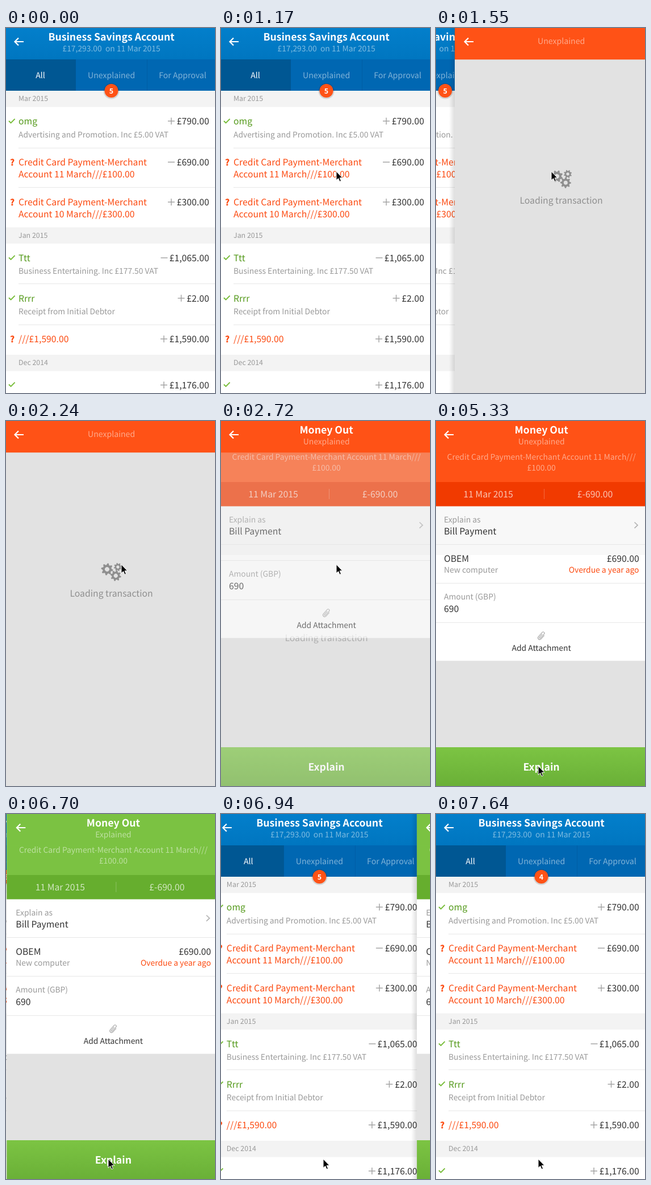
An HTML page for the animation above (8000 ms loop, 368x640 px).

```html
<!DOCTYPE html>
<html lang="en">
<head>
<meta charset="utf-8">
<title>Explain a transaction</title>
<style>
html, body { margin: 0; width: 100%; height: 100%; overflow: hidden; background: #fff; }
svg { display: block; width: 368px; height: 640px; }
text {
  font-family: "Noto Sans CJK JP", "Noto Sans CJK SC", "Noto Sans CJK KR", "Noto Sans CJK", "Open Sans", sans-serif;
  font-size: 15.75px; text-rendering: geometricPrecision;
}
.title { font-size: 17.7px; font-weight: 700; fill: #fff; }
.tab { font-size: 14.1px; }
.sub { font-size: 13.87px; }
.month { font-size: 12.4px; fill: #999; }
.mid { text-anchor: middle; }
.end { text-anchor: end; }
.grey { fill: #999; }
.dark { fill: #333; }
.orange { fill: #fc4a10; }
.green { fill: #559a1c; }
.soft { fill: #fff; fill-opacity: .5; }
.date { fill: #fff; fill-opacity: .7; }
.line { fill: none; }
</style>
</head>
<body>
<svg id="stage" viewBox="0 0 368 640" xmlns="http://www.w3.org/2000/svg"></svg>
<script>
const LOOP = 8000, CX = 185.6;
const ORANGE = [255, 82, 22], RED = [241, 58, 0], GREEN = [123, 194, 66], LEAF = [102, 174, 46];

// Markup helpers
const text = (x, y, cls, str, id = '') => `<text x="${x}" y="${y}" class="${cls}" id="${id}">${str}</text>`;
const rect = (x, y, w, h, fill, id = '') => `<rect x="${x}" y="${y}" width="${w}" height="${h}" fill="${fill}" id="${id}"/>`;
const path = (d, stroke, width, extra = '') => `<path class="line" d="${d}" stroke="${stroke}" stroke-width="${width}" ${extra}/>`;
const rule = (x, y) => rect(x, y, 374, 1, '#e7e7e7');
const group = (id, ...parts) => `<g id="${id}">${parts.join('')}</g>`;
const arrow = path('M31 24H15.5M22 17.5L15.5 24L22 30.5', '#fff', 2.2);

function month(y, label) {
  return rect(-2, y, 374, 28.5, '#f3f3f3') + text(22, y + 18.3, 'month', label);
}

function amount(y, x, sign, value) {
  const up = sign === '+' ? `M${x} ${y - 12}v12` : '';
  return path(`M${x - 6} ${y - 6}h12${up}`, '#a6a6a6', 1.5) + text(357.7, y, 'end dark', value);
}

const tick = y => path(`M5 ${y}l3.6 3.4l7 -7`, '#78bd3a', 2);
const query = y => text(11, y, 'mid orange', '?').replace('<text', '<text style="font-size:15px;font-weight:900" stroke="#fc4a10" stroke-width=".4"');

function gear(id, x, y, r, teeth) {
  let d = '';
  for (let i = 0; i < teeth * 4; i++) {
    const a = (i + .5) / (teeth * 4) * Math.PI * 2, k = i % 4 < 2 ? r : r * .74;
    d += `${i ? 'L' : 'M'}${(k * Math.cos(a)).toFixed(2)} ${(k * Math.sin(a)).toFixed(2)}`;
  }
  const h = r * .37;
  d += `ZM${h} 0A${h} ${h} 0 1 0 ${-h} 0A${h} ${h} 0 1 0 ${h} 0Z`;
  return `<g transform="translate(${x} ${y})"><path id="${id}" d="${d}" fill="#8f8f8f" fill-rule="evenodd"/></g>`;
}

const list = group('list',
  rect(-2, 0, 374, 640, '#fff'),
  rect(-2, 0, 374, 55, 'url(#sky)'), rect(-2, 55, 374, 55, '#0067b2'),
  rect(-2, 55, 125, 55, '#005793'), rect(248, 55, 1, 55, '#005ea5'),
  arrow,
  text(CX, 22.3, 'title mid', 'Business Savings Account'),
  text(CX, 40.5, 'sub soft mid', '£17,293.00\u00a0 on 11 Mar 2015'),
  text(60.5, 88, 'tab mid', 'All').replace('<text', '<text fill="#fff"'),
  text(CX, 88, 'tab soft mid', 'Unexplained'),
  text(311, 88, 'tab soft mid', 'For Approval'),
  month(110, 'Mar 2015'),
  '<circle cx="185.5" cy="110.5" r="14" fill="#000" fill-opacity=".13"/><circle cx="185.5" cy="110" r="12" fill="#ff5216"/>',
  text(185.5, 114.6, 'mid', '5', 'badge').replace('<text', '<text fill="#fff" style="font-size:12.5px;font-weight:700"'),
  tick(163), text(22, 169.3, 'green', 'omg'), amount(169.3, 291, '+', '£790.00'),
  text(22, 192, 'sub grey', 'Advertising and Promotion. Inc £5.00 VAT'),
  rule(22, 210),
  query(240.5), text(22, 241.2, 'orange', 'Credit Card Payment-Merchant'),
  text(22, 262.2, 'orange', 'Account 11 March///£100.00'), amount(241.2, 291, '-', '£690.00'),
  rule(22, 279),
  query(310.5), text(22, 311.2, 'orange', 'Credit Card Payment-Merchant'),
  text(22, 332.2, 'orange', 'Account 10 March///£300.00'), amount(311.2, 291, '+', '£300.00'),
  month(349.5, 'Jan 2015'),
  tick(402.5), text(22, 409, 'green', 'Ttt'), amount(409, 278.5, '-', '£1,065.00'),
  text(22, 431, 'sub grey', 'Business Entertaining. Inc £177.50 VAT'),
  rule(22, 448),
  tick(473), text(22, 479.7, 'green', 'Rrrr'), amount(479.7, 308.5, '+', '£2.00'),
  text(22, 502, 'sub grey', 'Receipt from Initial Debtor'),
  rule(22, 520),
  query(550.5), text(22, 551.2, 'orange', '///£1,590.00'), amount(551.2, 278, '+', '£1,590.00'),
  month(573, 'Dec 2014'),
  tick(625), amount(632, 278, '+', '£1,176.00'));

const loading = group('loading',
  group('gears', gear('g1', 178, 260, 10.5, 8), gear('g2', 197, 256, 7.2, 8), gear('g3', 193.3, 271.3, 9.5, 8)),
  text(CX, 307.7, 'mid', 'Loading transaction', 'wait').replace('<text', '<text fill="#8f8f8f"'));

const lower = group('lower',
  rect(-2, 217, 374, 203.5, '#fff'), rule(-2, 284),
  text(14, 313.3, 'sub grey', 'Amount (GBP)'), text(14, 334.5, 'dark', '690'),
  rule(-2, 353),
  path('M3-4V4a3 3 0 0 1-6 0V-5.500a2.100 2.100 0 0 1 4.200 0V3.500a1.100 1.100 0 0 1-2.200 0V-3.500', '#a9a9a9', 1.1,
    'transform="translate(185.5 377) rotate(42) scale(1.05)"'),
  text(CX, 403, 'sub dark mid', 'Add Attachment'));

const bill = group('bill',
  text(14, 247.2, 'dark', 'OBEM'), text(357.7, 247.2, 'dark end', '£690.00'),
  text(14, 266.3, 'sub grey', 'New computer'), text(357.5, 266.3, 'sub orange end', 'Overdue a year ago'));

const content = group('content',
  lower,
  rect(-2, 149, 374, 86, '#f8f8f8', 'band'), rule(-2, 216),
  rect(-2, 55, 374, 52, '', 'memo'), rect(-2, 107, 374, 42.5, '', 'strip'),
  text(CX, 67.6, 'sub soft mid', 'Credit Card Payment-Merchant Account 11 March///'),
  text(CX, 87, 'sub soft mid', '£100.00'),
  text(92, 134.3, 'date mid', '11 Mar 2015'), text(280, 134.3, 'date mid', '£-690.00'),
  '<rect x="190" y="119" width="1" height="18" fill="#fff" fill-opacity=".25"/>',
  text(14, 178, 'sub grey', 'Explain as'), text(14, 199, 'dark', 'Bill Payment'),
  path('M349.500 177.500l5.500 5.200l-5.500 5.200', '#b3b3b3', 1.7),
  bill,
  rect(-2, 572, 374, 68, 'url(#leaf)'),
  text(CX, 612.8, 'title mid', 'Explain'));

const detail = group('detail',
  rect(-12, 0, 10, 640, 'url(#shade)'), rect(-2, 0, 374, 640, '#e2e2e2'),
  loading, content,
  rect(-2, 0, 374, 55.3, '', 'bar'), arrow,
  text(CX, 28.3, 'tab soft mid', 'Unexplained', 'early'),
  group('heading',
    text(CX, 22.3, 'title mid', 'Money Out'),
    text(CX, 40.5, 'sub soft mid', 'Unexplained', 'before'),
    text(CX, 40.5, 'sub soft mid', 'Explained', 'after')));

const grad = (id, dir, a, b) => `<linearGradient id="${id}" ${dir}><stop ${a}/><stop offset="1" ${b}/></linearGradient>`;
const down = 'x1="0" y1="0" x2="0" y2="1"';
document.getElementById('stage').innerHTML = '<defs>' +
  grad('sky', down, 'stop-color="#037fcb"', 'stop-color="#0076c0"') +
  grad('leaf', down, 'stop-color="#7cc443"', 'stop-color="#6ab037"') +
  grad('shade', '', 'stop-opacity="0"', 'stop-opacity=".13"') + '</defs>' + list + detail +
  '<path id="cursor" d="M0 0V15.500L3.600 12.200L6 17.800L8.500 16.700L6.100 11.300H10.900Z" fill="#000" stroke="#fff" stroke-width="1"/>';

// Timing helpers
const el = {};
document.querySelectorAll('#stage [id]').forEach(n => { if (n.id) el[n.id] = n; });
const part = (t, a, b) => Math.min(1, Math.max(0, (t - a) / (b - a)));
const outQuad = p => 1 - (1 - p) * (1 - p);
const inOut = p => p * p * (3 - 2 * p);
const mix = (a, b, p) => `rgb(${a.map((v, i) => Math.round(v + (b[i] - v) * p))})`;
const move = (n, x, y) => n.setAttribute('transform', `translate(${x.toFixed(2)} ${y.toFixed(2)})`);
const fade = (n, o) => { n.style.opacity = o; };

// cubic-bezier(.1, .7, .1, 1)
function glide(x) {
  if (x <= 0 || x >= 1) return x <= 0 ? 0 : 1;
  let lo = 0, hi = 1;
  for (let i = 0; i < 24; i++) {
    const s = (lo + hi) / 2;
    if (.3 * s * (1 - s) + s ** 3 < x) lo = s; else hi = s;
  }
  const q = 1 - lo;
  return 2.1 * lo * q * q + 3 * lo * lo * q + lo ** 3;
}

function pointer(t) {
  if (t < 940) {
    const p = outQuad(part(t, 520, 940));
    return [366 - 163 * p, 381 - 129.5 * p];
  }
  if (t < 4240) {
    const p = inOut(part(t, 3490, 3750));
    return [203 - 16.5 * p, 251.5 + 16 * p];
  }
  if (t < 5075) {
    const p = inOut(part(t, 4240, 5060)), q = 1 - p;
    return [186.5 * q ** 3 + 420 * p * q * q + 555 * p * p * q + 179 * p ** 3, 267.500 + 302.500 * p];
  }
  const p = outQuad(part(t, 5075, 5330));
  return [179 + p, 570 + 35 * p];
}

function draw(t) {
  const back = t >= 6700 ? Math.max(.009, glide((t - 6745) / 430)) : 0;
  const open = glide((t - 1360) / 500) - back;
  move(el.list, -187 * open, 0);
  move(el.detail, 371 * (1 - open), 0);
  el.detail.style.display = open > 0 ? '' : 'none';
  el.badge.textContent = t < 7310 ? '5' : '4';

  const spin = t * .18;
  el.g1.setAttribute('transform', `rotate(${spin})`);
  el.g2.setAttribute('transform', `rotate(${-spin * 1.4})`);
  el.g3.setAttribute('transform', `rotate(${-spin})`);

  const shown = part(t, 2560, 2800);
  fade(el.content, shown);
  fade(el.gears, shown > 0 ? 0 : 1);
  fade(el.wait, 1 - part(t, 2640, 2860));
  move(el.loading, 0, shown > 0 ? 78 : 0);
  fade(el.early, 1 - part(t, 2540, 2620));
  fade(el.heading, part(t, 2560, 2700));

  const grown = part(t, 3110, 3190);
  move(el.lower, 0, -40 * (1 - grown));
  fade(el.bill, grown);

  const done = part(t, 5760, 6160);
  el.bar.style.fill = el.memo.style.fill = mix(ORANGE, GREEN, done);
  el.strip.style.fill = mix(RED, LEAF, done);
  el.band.style.fill = t < 5780 ? '#f8f8f8' : '#fff';
  fade(el.before, 1 - done);
  fade(el.after, done);

  el.cursor.style.display = t < 540 ? 'none' : '';
  move(el.cursor, ...pointer(t));
}

const start = performance.now();
function tickFrame() {
  draw((performance.now() - start) % LOOP);
  requestAnimationFrame(tickFrame);
}
tickFrame();
</script>
</body>
</html>
```
